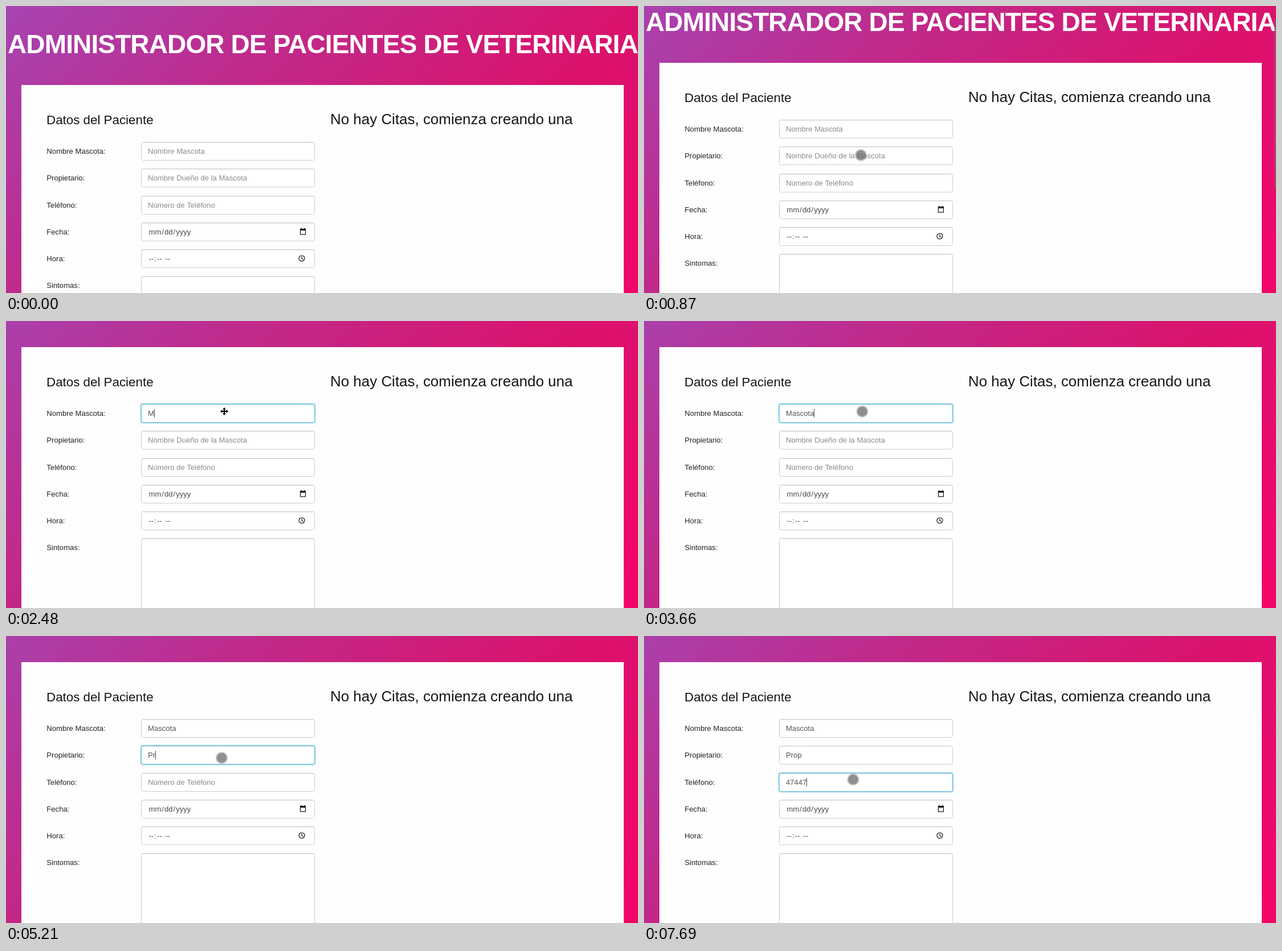
An HTML page with a canvas for the animation above (8 s loop, 1109 by 505 pixels).

```html
<!DOCTYPE html>
<html lang="es">
<head>
<meta charset="utf-8">
<title>Administrador de pacientes</title>
<style>
  html, body { margin: 0; width: 100%; height: 100%; overflow: hidden; }
  canvas { display: block; }
</style>
</head>
<body>
<canvas id="stage" width="1109" height="505"></canvas>
<script>
const W = 1109, H = 505, LOOP = 8000, PAGE_H = 856;
const ctx = document.getElementById('stage').getContext('2d');
const FONT = '"Liberation Sans", Arial, sans-serif';
const FIELD = { x: 237, w: 305, h: 33 };

const labels = ['Nombre Mascota:', 'Propietario:', 'Teléfono:', 'Fecha:', 'Hora:', 'Sintomas:'];

// Typed fields: key times, focus span and moments when the caret blinks
const inputs = [
  { hint: 'Nombre Mascota', text: 'Mascota', keys: [2480, 2570, 2620, 2850, 3010, 3100, 3290],
    focus: 1530, blur: 3980 },
  { hint: 'Nombre Dueño de la Mascota', text: 'Prop', keys: [5060, 5210, 5350, 5540],
    focus: 4040, blur: 6470 },
  { hint: 'Número de Teléfono', text: '47447', keys: [7180, 7220, 7360, 7550, 7690],
    focus: 6480, blur: Infinity }
];

// The page scrolls in hard steps
const scrollSteps = [[0, 0], [820, 9], [870, 39], [920, 69], [970, 86], [1020, 93]];

// The pointer first jumps, then glides
const jumps = [[260, 953.5, 487.5], [320, 941.5, 482.5], [460, 977.5, 481], [505, 868, 415],
  [550, 607, 317], [595, 402, 270], [640, 380.5, 262.5]];
const glide = [[1020, 380.5, 262.5], [1100, 380, 225], [1150, 377, 196], [1250, 379, 178],
  [1400, 383, 159], [3660, 383, 159], [3760, 382, 178], [3900, 378.5, 214.5],
  [6050, 378.5, 214.5], [6150, 374, 235], [6240, 369, 251], [6400, 367, 252.5]];
const crossTimes = [[2060, 2530], [4740, 5110]];

const clamp = v => Math.max(0, Math.min(1, v));
const within = (t, [a, b]) => t >= a && t < b;
const held = (steps, t) => steps.filter(k => k[0] <= t).pop().slice(1);

function eased(keys, t) {
  if (t <= keys[0][0]) return keys[0].slice(1);
  for (let i = 1; i < keys.length; i++) {
    const a = keys[i - 1], b = keys[i];
    if (t < b[0]) {
      const k = (t - a[0]) / (b[0] - a[0]);
      return a.slice(1).map((v, j) => v + (b[j + 1] - v) * k);
    }
  }
  return keys[keys.length - 1].slice(1);
}

function write(str, x, y, size, color) {
  ctx.font = `${size}px ${FONT}`;
  ctx.fillStyle = color;
  ctx.fillText(str, x, y);
  return ctx.measureText(str).width;
}

function box(x, y, w, h, r) {
  ctx.beginPath();
  ctx.roundRect(x, y, w, h, r);
}

function drawBackground(scroll) {
  // 135deg gradient over the whole page
  const half = (W + PAGE_H) / 2;
  const g = ctx.createLinearGradient(0, -scroll, half, half - scroll);
  [[0, '#a644b2'], [0.27, '#c02a8b'], [0.56, '#da136d'], [0.82, '#f00769'], [1, '#f80265']]
    .forEach(([at, color]) => g.addColorStop(at, color));
  ctx.fillStyle = g;
  ctx.fillRect(0, 0, W, H);
}

function drawTitle(y) {
  ctx.font = `bold 46px ${FONT}`;
  ctx.letterSpacing = '-0.87px';
  ctx.fillStyle = '#fff';
  ctx.fillText('ADMINISTRADOR DE PACIENTES DE VETERINARIA', 3, y);
  ctx.letterSpacing = '0px';
}

function drawField(y, h, glow) {
  const { x, w } = FIELD;
  if (glow > 0) {
    ctx.globalAlpha = glow;
    ctx.fillStyle = '#d3edf5';
    box(x - 2, y - 2, w + 4, h + 4, 5);
    ctx.fill();
    ctx.fillStyle = '#a9dcec';
    box(x - 1, y - 1, w + 2, h + 2, 4);
    ctx.fill();
    ctx.globalAlpha = 1;
  }
  ctx.fillStyle = '#fff';
  box(x, y, w, h, 3.5);
  ctx.fill();
  ctx.fillStyle = 'rgba(0,0,0,.08)';
  ctx.fillRect(x + 1, y + 1, w - 2, 1);
  ctx.lineWidth = 1;
  box(x + 0.5, y + 0.5, w - 1, h - 1, 3);
  ctx.strokeStyle = '#c9ced2';
  ctx.stroke();
  if (glow > 0) {
    ctx.globalAlpha = glow;
    ctx.strokeStyle = '#66bcd9';
    ctx.stroke();
    ctx.globalAlpha = 1;
  }
}

function drawInput(input, y, t) {
  const fade = start => clamp((t - start) / 150);
  drawField(y, FIELD.h, fade(input.focus) * (1 - fade(input.blur)));
  const pressed = input.keys.filter(k => k <= t);
  const typed = input.text.slice(0, pressed.length);
  write(typed || input.hint, 249, y + 21, 13.1, typed ? '#555' : '#8a8a8a');
  if (t < input.focus || t >= input.blur) return;
  const since = t - Math.max(input.focus, ...pressed);
  if (since % 1000 < 500) {
    const x = 249 + Math.round(ctx.measureText(typed).width);
    ctx.fillStyle = '#444';
    ctx.fillRect(x, y + 9, 1, 15);
  }
}

// Date and time parts each have a pixel of padding
function drawParts(parts, y) {
  let x = 249.5;
  for (const part of parts) x += write(part, x + 1, y + 21, 13.1, '#484848') + 1;
}

function drawCalendar(y) {
  ctx.fillStyle = '#111';
  ctx.fillRect(516, y + 11, 10, 3);
  ctx.fillRect(517, y + 10, 2, 2);
  ctx.fillRect(523, y + 10, 2, 2);
  ctx.strokeStyle = '#111';
  ctx.lineWidth = 1.2;
  ctx.strokeRect(516.5, y + 12.5, 9, 8.5);
}

function drawClock(y) {
  ctx.strokeStyle = '#111';
  ctx.lineWidth = 1.2;
  ctx.beginPath();
  ctx.arc(519, y + 16, 5, 0, Math.PI * 2);
  ctx.moveTo(519, y + 12.5);
  ctx.lineTo(519, y + 16.3);
  ctx.lineTo(521.8, y + 17.8);
  ctx.stroke();
}

function drawPage(scroll, t) {
  drawTitle(83 - scroll);
  ctx.fillStyle = '#fefefe';
  ctx.fillRect(27, 139 - scroll, 1057, 800);
  write('Datos del Paciente', 71, 208 - scroll, 22.35, '#161616');
  write('No hay Citas, comienza creando una', 569, 208 - scroll, 25.95, '#161616');

  labels.forEach((label, i) => {
    const y = Math.floor(239.5 + 47.25 * i) - scroll;
    write(label, 71.3, y + 21, 13.1, '#222');
    if (inputs[i]) drawInput(inputs[i], y, t);
    else drawField(y, i === 5 ? 170 : FIELD.h, 0);
    if (i === 3) {
      drawParts(['mm', '/', 'dd', '/', 'yyyy'], y);
      drawCalendar(y);
    }
    if (i === 4) {
      drawParts(['--', ':', '--', ' ', '--'], y);
      drawClock(y);
    }
  });
}

function drawScrollbar(scroll, t) {
  if (t < 820 || t >= 1580) return;
  ctx.fillStyle = 'rgba(130,100,120,.6)';
  ctx.fillRect(1106, scroll * H / PAGE_H, 3, H * H / PAGE_H);
}

function drawDisc(x, y) {
  for (const [r, color] of [[10.5, 'rgba(120,120,120,.45)'], [8.5, 'rgba(92,92,92,.5)']]) {
    ctx.fillStyle = color;
    ctx.beginPath();
    ctx.arc(x, y, r, 0, Math.PI * 2);
    ctx.fill();
  }
}

function drawCross(x, y) {
  ctx.save();
  ctx.translate(x, y);
  ctx.fillStyle = '#000';
  for (let i = 0; i < 4; i++) {
    ctx.fillRect(-1, -5, 2, 6);
    ctx.beginPath();
    ctx.moveTo(0, -7);
    ctx.lineTo(3, -3.6);
    ctx.lineTo(-3, -3.6);
    ctx.fill();
    ctx.rotate(Math.PI / 2);
  }
  ctx.restore();
}

function drawPointer(t) {
  if (t < jumps[0][0]) return;
  const [x, y] = t < glide[0][0] ? held(jumps, t) : eased(glide, t);
  (crossTimes.some(span => within(t, span)) ? drawCross : drawDisc)(x, y);
}

function draw(t) {
  const [scroll] = held(scrollSteps, t);
  drawBackground(scroll);
  drawPage(scroll, t);
  drawScrollbar(scroll, t);
  drawPointer(t);
}

function tick() {
  draw(performance.now() % LOOP);
  requestAnimationFrame(tick);
}
tick();
</script>
</body>
</html>
```
